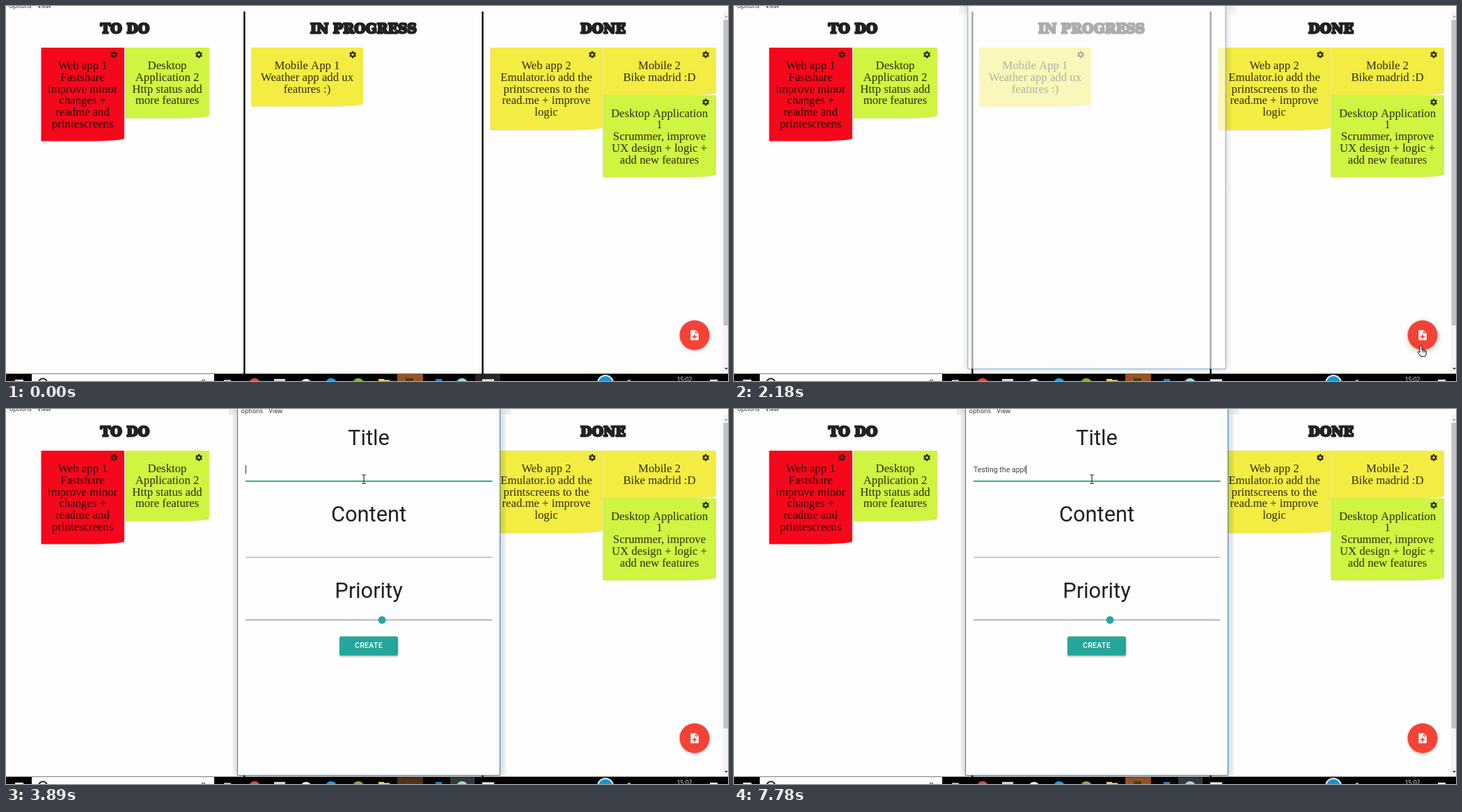
Animation, 1037 px wide and 540 px high, one loop 8000 ms. Source, as an HTML page with a canvas:

```html
<!DOCTYPE html>
<html lang="en">
<head>
<meta charset="utf-8">
<title>Task board</title>
<style>
html, body { margin: 0; width: 100%; height: 100%; overflow: hidden; background: #fefefe; }
canvas { display: block; }
</style>
</head>
<body>
<canvas id="stage" width="1037" height="540"></canvas>
<script>
const ctx = document.getElementById('stage').getContext('2d');
const LOOP = 8000;
const INK = '#212121', TEAL = '#26a69a', PAGE = '#fefefe';
const RED = '#f5081b', GREEN = '#cff441', YELLOW = '#f3ec42';
const SERIF = '"Liberation Serif", serif';
const SANS = 'Roboto, sans-serif';
const UI = '"Open Sans", sans-serif';

const NOTES = [
  [50, 60, 120, 134, RED, ['Web app 1', 'Fastshare', 'improve minor', 'changes +', 'readme and', 'printescreens']],
  [171, 60, 121, 101, GREEN, ['Desktop', 'Application 2', 'Http status add', 'more features']],
  [352, 60, 161, 84, YELLOW, ['Mobile App 1', 'Weather app add ux', 'features :)']],
  [695, 60, 162, 118, YELLOW, ['Web app 2', 'Emulator.io add the', 'printscreens to the', 'read.me + improve', 'logic']],
  [857, 60, 163, 68, YELLOW, ['Mobile 2', 'Bike madrid :D']],
  [857, 128.5, 163, 117.5, GREEN, ['Desktop Application', '1', 'Scrummer, improve', 'UX design + logic +', 'add new features']]
];

// Pointer route: time, x, y
const ROUTE = [
  [60, 776, 520], [450, 82, 18], [850, 130, 70], [1140, 130, 70], [1300, 265, 100],
  [1360, 265, 100], [1860, 988, 497], [2550, 988, 497], [3290, 514, 101], [8000, 514, 101]
];

// Text field: time, text length
const TYPED = 'Testing the appli';
const KEYS = [
  [4550, 1], [4770, 2], [5060, 3], [5250, 4], [5440, 5], [5650, 6], [5870, 7], [6090, 8],
  [6150, 9], [6280, 10], [6400, 11], [6530, 12],
  [6810, 13], [6980, 14], [7150, 15], [7330, 16], [7500, 17], [7780, 16]
];

const clamp = v => Math.max(0, Math.min(1, v));
const smooth = v => v * v * (3 - 2 * v);

function rect(x, y, w, h, color) {
  ctx.fillStyle = color;
  ctx.fillRect(x, y, w, h);
}

function disc(x, y, r, color) {
  ctx.fillStyle = color;
  ctx.beginPath();
  ctx.arc(x, y, r, 0, Math.PI * 2);
  ctx.fill();
}

function ring(x, y, r, width, color) {
  ctx.strokeStyle = color;
  ctx.lineWidth = width;
  ctx.beginPath();
  ctx.arc(x, y, r, 0, Math.PI * 2);
  ctx.stroke();
}

function poly(points, color) {
  ctx.fillStyle = color;
  ctx.beginPath();
  points.forEach(([x, y]) => ctx.lineTo(x, y));
  ctx.closePath();
  ctx.fill();
}

function text(str, x, y, font, color = INK, align = 'center') {
  ctx.font = font;
  ctx.fillStyle = color;
  ctx.textAlign = align;
  ctx.fillText(str, x, y);
}

function shadow(color, blur = 0, dy = 0) {
  ctx.shadowColor = color;
  ctx.shadowBlur = blur;
  ctx.shadowOffsetY = dy;
}

const noShadow = () => shadow('transparent');

function heading(str, x) {
  text(str, x, 39, '700 19px "DejaVu Serif", serif');
  ctx.strokeStyle = INK;
  ctx.lineWidth = 2.8;
  ctx.lineJoin = 'round';
  ctx.strokeText(str, x, 39);
}

function gear(x, y) {
  ctx.strokeStyle = '#26260f';
  ctx.lineWidth = 2.3;
  ctx.beginPath();
  for (let i = 0; i < 6; i++) {
    const a = i * Math.PI / 3 + Math.PI / 6;
    ctx.moveTo(x + 2.6 * Math.cos(a), y + 2.6 * Math.sin(a));
    ctx.lineTo(x + 5 * Math.cos(a), y + 5 * Math.sin(a));
  }
  ctx.stroke();
  ring(x, y, 2.8, 2, '#26260f');
}

function note([x, y, w, h, color, lines]) {
  const left = x + 0.5, right = x + w - 0.2, low = y + h - 3.5;
  shadow('rgba(0,0,0,.15)', 1.5, 0.5);
  ctx.fillStyle = color;
  ctx.beginPath();
  ctx.moveTo(left, y);
  ctx.lineTo(right, y);
  ctx.lineTo(right, low);
  ctx.ellipse(right - 50, low, 50, 4, 0, 0, Math.PI / 2);
  ctx.lineTo(left, low + 4);
  ctx.fill();
  noShadow();
  gear(x + w - 15, y + 10);
  lines.forEach((line, i) =>
    text(line, x + w / 2, y + 31 + i * 16.8, '16.75px ' + SERIF, 'rgba(0,0,0,.82)'));
}

function addButton(hover) {
  shadow('rgba(0,0,0,.22)', 4 + 4 * hover, 1.5 + hover);
  disc(989, 474, 21.5, '#f44336');
  noShadow();
  poly([[983.3, 466.8], [990.3, 466.8], [994.8, 471.2], [994.8, 481.2], [983.3, 481.2]], '#fff');
  poly([[990, 467.8], [990, 471.5], [993.8, 471.5]], '#f44336');
  rect(988.2, 473, 1.7, 6.4, '#f44336');
  rect(985.8, 475.4, 6.4, 1.7, '#f44336');
}

function menu(x, y) {
  text('options', x, y, '9px ' + UI, '#222', 'left');
  text('View', x + 40, y, '9px ' + UI, '#222', 'left');
}

function board(t) {
  rect(0, 0, 1037, 540, PAGE);
  menu(5, 3.3);
  rect(341.2, 8, 2.4, 522, '#0b0b0b');
  rect(683.4, 8, 2.4, 522, '#0b0b0b');
  heading('TO DO', 171);
  heading('IN PROGRESS', 513.5);
  heading('DONE', 857.5);
  NOTES.forEach(note);
  rect(1030, 8, 7, 522, '#f3f3f3');
  rect(1030.5, 20, 6.5, 440, '#c1c1c1');
  poly([[1032, 16.5], [1037, 16.5], [1034.5, 13.5]], '#a5a5a5');
  poly([[1032, 521], [1037, 521], [1034.5, 524]], '#444');
  addButton(clamp((t - 1800) / 100) * clamp((2750 - t) / 100));
}

function pulse(t) {
  const dip = (a, b) => Math.sin(Math.PI * clamp((t - a) / (b - a))) ** 2;
  return 1 - 0.45 * (dip(100, 800) + dip(3450, 4470) + dip(5060, 6000));
}

function taskbar(t) {
  rect(0, 529.5, 1037, 10.5, '#030303');
  rect(13, 538, 12, 2, '#eee');
  rect(37, 530, 262, 10, '#fdfdfd');
  ring(53, 542.5, 6, 2, '#222');
  ctx.strokeStyle = '#555';
  ctx.lineWidth = 1;
  ctx.strokeRect(281.5, 538.5, 4, 4);
  if (t < 2010) rect(674, 530, 36, 10, '#262626');
  if (t > 2300) rect(638, 530, 35, 10, '#343a3b');
  const p = pulse(t);
  rect(562, 530, 37, 10, `rgb(${150 * p},${84 * p},${32 * p + 4})`);
  rect(313, 538.5, 10, 1.5, '#ddd');
  disc(357, 544, 8, '#dd4b3e');
  rect(385, 537, 16, 3, '#d8d8d8');
  disc(431, 545, 8, '#f2f2f2');
  disc(467, 544, 8, '#12a5e8');
  disc(506, 544, 8, '#7fb23c');
  rect(535, 537, 8, 3, '#e9c75a');
  rect(538, 538.5, 13, 1.5, '#f6dc84');
  rect(574, 536, 11, 4, '#4a3c1c');
  rect(617, 537, 9, 3, '#1d7fd0');
  disc(655, 544, 8, '#9fd8e8');
  rect(684, 537.5, 17, 2.5, '#f2f2f2');
  disc(861, 543, 12, '#e8f6fc');
  disc(861, 543, 10, '#1795cf');
  rect(893, 538.5, 4, 1.5, '#ccc');
  text('15:02', 974.5, 540.6, '8.5px ' + UI, '#fff');
  rect(1011, 538, 11, 2, '#f2f2f2');
}

function field(t) {
  let len = 0;
  for (const [at, n] of KEYS) if (t >= at) len = n;
  const str = TYPED.slice(0, len);
  text(str, 344, 90.6, '10.6px ' + SANS, '#444', 'left');
  const blinkOff = t >= 3970 && t < 4470;
  if (t >= 3450 && !blinkOff) rect(344 + ctx.measureText(str).width, 81, 1, 12.5, '#333');
  rect(344, 103.5, 354.5, 1, '#9e9e9e');
  ctx.globalAlpha = clamp((t - 3450) / 250);
  rect(344, 103, 354.5, 1.8, TEAL);
  ctx.globalAlpha = 1;
}

function form(t) {
  const title = '30.8px ' + SANS;
  text('Title', 521, 52, title);
  field(t);
  text('Content', 521, 162, title);
  rect(344, 213, 354.5, 1, '#9e9e9e');
  text('Priority', 521, 271.8, title);
  rect(344, 302.5, 354, 2.4, '#c2c0c2');
  disc(540, 303.8, 5.5, TEAL);
  shadow('rgba(0,0,0,.3)', 3, 1.5);
  ctx.fillStyle = TEAL;
  ctx.beginPath();
  ctx.roundRect(479, 327.5, 84, 27.5, 2);
  ctx.fill();
  noShadow();
  ctx.letterSpacing = '0.3px';
  text('CREATE', 521, 344.3, '500 10.6px ' + SANS, '#fff');
  ctx.letterSpacing = '0px';
}

// Shade around the dialog only, so that a see-through dialog stays white
function dialogShade() {
  ctx.save();
  ctx.beginPath();
  ctx.rect(0, -60, 1037, 660);
  ctx.rect(332.5, -40, 377, 567);
  ctx.clip('evenodd');
  rect(319.5, -20, 406, 28, '#ececec');
  rect(326, 8, 392, 519, 'rgba(0,0,0,.04)');
  shadow('rgba(0,0,0,.22)', 10, 2);
  rect(332.5, -40, 377, 567, PAGE);
  ctx.restore();
}

function dialog(t) {
  const k = clamp((t - 2010) / 250);
  if (!k) return;
  const scale = 0.943 + 0.057 * k;
  ctx.save();
  ctx.translate(521, 262);
  ctx.scale(scale, scale);
  ctx.translate(-521, -262);
  ctx.globalAlpha = k < 1 ? k * 0.93 : 1;
  dialogShade();
  rect(332.5, -40, 377, 567, PAGE);
  ctx.strokeStyle = '#2a80bd';
  ctx.lineWidth = 1;
  ctx.strokeRect(332.5, -40, 377, 567.5);
  if (t >= 2300) menu(337.5, 5.8);
  if (t >= 2550) form(t);
  ctx.restore();
}

function outline(points, scale) {
  ctx.beginPath();
  points.forEach(([x, y]) => ctx.lineTo(x * scale, y * scale));
  ctx.closePath();
  ctx.fillStyle = '#fff';
  ctx.fill();
  ctx.strokeStyle = '#111';
  ctx.lineWidth = 1;
  ctx.lineJoin = 'round';
  ctx.stroke();
}

const arrow = () =>
  outline([[0, 0], [0, 16], [4, 12.5], [6.5, 18], [9, 17], [6.5, 11.5], [11.5, 11.5]], 0.84);

function hand() {
  outline([[-3, -7], [-1.5, -8], [0, -7], [0, -2], [3, -1.5], [6, 0], [6.3, 4], [4.5, 7.5],
    [-2, 7.5], [-3.5, 5], [-6, 1.5], [-5, 0.3], [-3, 2]], 1);
  for (const x of [0, 2, 4]) rect(x, -1.5, 0.8, 3.5, '#222');
}

function beam(color) {
  rect(-0.6, -6, 1.2, 12.5, color);
  rect(-3, -6.5, 6, 1, color);
  rect(-3, 5.8, 6, 1, color);
}

function pointer(t) {
  if (t < ROUTE[0][0]) return;
  const i = ROUTE.findIndex(p => p[0] > t) - 1;
  const [t0, x0, y0] = ROUTE[i], [t1, x1, y1] = ROUTE[i + 1];
  const k = smooth((t - t0) / (t1 - t0));
  ctx.save();
  ctx.translate(x0 + (x1 - x0) * k, y0 + (y1 - y0) * k);
  if (t >= 1250 && t < 1390) beam('#3550b8');
  else if (t >= 1810 && t < 2650) hand();
  else if (t >= 3230) beam('#333');
  else arrow();
  ctx.restore();
}

function frame(now) {
  const t = now % LOOP;
  board(t);
  taskbar(t);
  dialog(t);
  pointer(t);
  requestAnimationFrame(frame);
}

requestAnimationFrame(frame);
</script>
</body>
</html>
```
